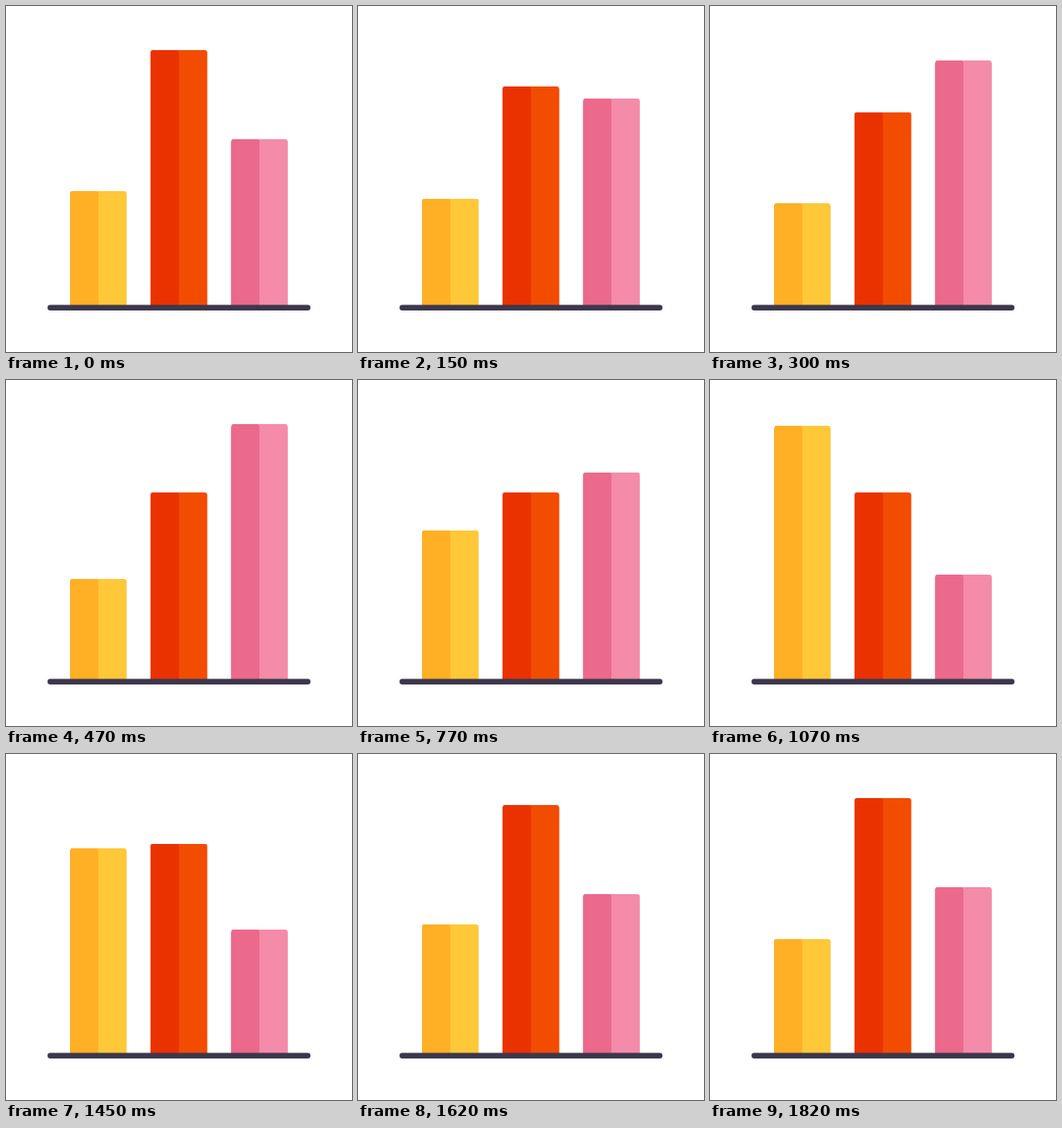
Animation of 400 by 400 pixels, one loop 2.02 s. Source, as an HTML page:

```html
<!DOCTYPE html>
<html lang="en">
<head>
<meta charset="utf-8">
<title>Bar chart</title>
<style>
  html, body { margin: 0; width: 100%; height: 100%; overflow: hidden; background: #fff; }
  svg { display: block; width: 100%; height: 100%; }

  .bar {
    --ease: cubic-bezier(.3, 0, .15, 1);
    animation: 2020ms var(--ease) infinite;
  }
  .yellow { animation-name: yellow; }
  .red { animation-name: red; }
  .pink { animation-name: pink; }

  /* Three moves with a rest after each; values are the bar tops. */
  @keyframes yellow {
    0% { transform: translateY(214px); }
    24.26%, 32.67% { transform: translateY(230px); }
    57.33% { transform: translateY(50.6px); }
    66.53% { transform: translateY(50.6px); animation-timing-function: cubic-bezier(.28, 0, .15, 1); }
    89.5%, 100% { transform: translateY(214px); }
  }
  @keyframes red {
    0% { transform: translateY(51px); }
    24.26%, 66.53% { transform: translateY(130px); }
    89.5%, 100% { transform: translateY(51px); }
  }
  @keyframes pink {
    0% { transform: translateY(154.1px); animation-timing-function: cubic-bezier(.3, 0, .24, 1); }
    24.26%, 32.67% { transform: translateY(51.4px); }
    57.33%, 66.53% { transform: translateY(228px); }
    89.5%, 100% { transform: translateY(154.1px); }
  }
</style>
</head>
<body>
<svg viewBox="0 0 400 400">
  <clipPath id="above"><rect width="400" height="348"/></clipPath>
  <g clip-path="url(#above)">
    <g class="bar yellow">
      <rect x="74" width="65.5" height="310" rx="3" fill="#ffc839"/>
      <rect x="74" width="32.7" height="310" rx="3" fill="#ffb024"/>
    </g>
    <g class="bar red">
      <rect x="167.2" width="65.5" height="310" rx="3" fill="#f24c00"/>
      <rect x="167.2" width="32.7" height="310" rx="3" fill="#ea3200"/>
    </g>
    <g class="bar pink">
      <rect x="260.3" width="65.5" height="310" rx="3" fill="#f38ba9"/>
      <rect x="260.3" width="32.7" height="310" rx="3" fill="#eb698b"/>
    </g>
  </g>
  <rect x="48" y="345.5" width="304" height="6.5" rx="3.25" fill="#3d374c"/>
</svg>
</body>
</html>
```
